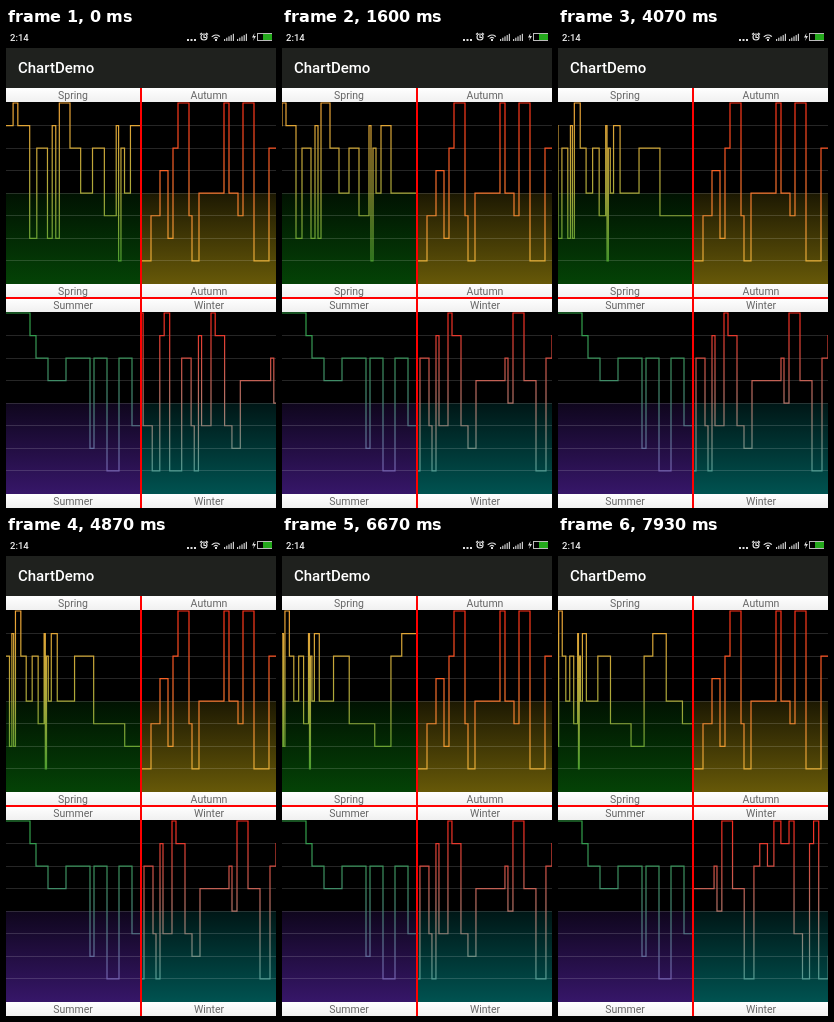
Recreate the animation shown at these times as an HTML page with a canvas. Size 270 by 480 pixels, loop 8 s.

```html
<!DOCTYPE html>
<html lang="en">
<head>
<meta charset="utf-8">
<title>ChartDemo</title>
<style>
html, body { margin: 0; width: 100%; height: 100%; overflow: hidden; background: #000; }
canvas { display: block; width: 270px; height: 480px; }
</style>
</head>
<body>
<canvas id="stage" width="270" height="480"></canvas>
<script>
const ctx = document.getElementById('stage').getContext('2d');
const LOOP = 8000, WIDTH = 134, STEP = 22.55;
const FONT = 'Roboto, "Noto Sans", sans-serif';

const noise = n => Math.abs(Math.sin(n * 12.9898) * 43758.5453) % 1;

// Random [start, level] steps filling the range from..to
function randomSteps(from, to, seed) {
  const steps = [];
  for (let u = from; u < to; u += 4 + 7 * noise(seed++)) steps.push([u, Math.floor(8 * noise(seed + 0.5))]);
  return steps;
}

// steps: [start, level]; view: [time, left, right] of the visible range
const charts = [
  {
    name: 'Spring', x: 0, y: 60, line: ['#f2a436', '#a8a83a', '#2f9a2c'], fill: '4,66,6',
    steps: [[-20, 1], [0, 0], [4, 1], [14, 6], [20, 2], [29, 6], [33, 1], [36, 6], [39, 0], [48, 2], [57, 4],
      [67, 2], [77, 5], [87, 1], [89, 7], [91, 2], [94, 4], [99, 1], [109, 4],
      [138, 2], [170, 5], [222, 6], [255, 2], [277, 1], [311, 4], [352, 5]],
    view: [[0, -6, 107], [440, 0, 134], [3070, 0, 134], [4070, 14, 219], [5470, 30, 269], [5930, 33, 306],
      [6670, 33, 306], [LOOP, 37.5, 380]]
  },
  {
    name: 'Autumn', x: 136, y: 60, line: ['#ff3018', '#f4742c', '#e0c03a'], fill: '102,88,8',
    steps: [[0, 7], [9, 5], [18, 3], [26, 6], [31, 2], [36, 0], [47, 5], [50, 7], [57, 4], [82, 0],
      [87, 4], [96, 5], [101, 0], [112, 7], [127, 2]],
    view: [[0, 0, 134]]
  },
  {
    name: 'Summer', x: 0, y: 270, line: ['#2fa444', '#468474', '#8054c0'], fill: '54,22,104',
    steps: [[0, 0], [24, 1], [30, 2], [42, 3], [60, 2], [84, 6], [88, 2], [101, 7], [113, 2], [126, 5]],
    view: [[0, 0, 134]]
  },
  {
    name: 'Winter', x: 136, y: 270, line: ['#f8281c', '#b07468', '#34a8a0'], fill: '0,82,80',
    steps: [...randomSteps(-40, 0, 7),
      [2, 2], [11, 5], [14, 7], [18, 1], [21, 5], [30, 0], [34, 1], [43, 5], [50, 6], [58, 3],
      [87, 2], [90, 4], [95, 0], [106, 3], [118, 7], [128, 2],
      ...randomSteps(134, 208, 3)],
    view: [[0, -36, 92], [440, 0, 134], [6670, 0, 134], [LOOP, 70, 208]]
  }
];

function rect(x, y, w, h, color) {
  ctx.fillStyle = color;
  ctx.fillRect(x, y, w, h);
}

function text(str, x, y, font, color, align = 'left') {
  ctx.font = `${font} ${FONT}`;
  ctx.fillStyle = color;
  ctx.textAlign = align;
  ctx.fillText(str, x, y);
}

function vertical(y0, y1, colors) {
  const g = ctx.createLinearGradient(0, y0, 0, y1);
  colors.forEach((c, i) => g.addColorStop(i / (colors.length - 1), c));
  return g;
}

function rangeAt(view, t) {
  const i = view.findIndex(key => key[0] > t);
  if (i < 0) return view[view.length - 1].slice(1);
  const a = view[i - 1], b = view[i], p = (t - a[0]) / (b[0] - a[0]);
  return [a[1] + (b[1] - a[1]) * p, a[2] + (b[2] - a[2]) * p];
}

function drawChart({ name, x, y, line, fill, steps, view }, t) {
  const top = y + 15, bottom = top + 8 * STEP, half = top + 4 * STEP;
  const [left, right] = rangeAt(view, t);
  const toX = u => (u - left) / (right - left) * WIDTH;

  ctx.save();
  ctx.translate(x, 0);
  ctx.beginPath();
  ctx.rect(0, y, WIDTH, 210);
  ctx.clip();
  rect(0, y, WIDTH, 210, '#000');
  rect(0, half, WIDTH, bottom - half + 1,
    vertical(half, bottom, [`rgba(${fill},.28)`, `rgba(${fill},1)`]));
  for (let i = 1; i < 8; i++) rect(0, Math.floor(top + i * STEP), WIDTH, 1, 'rgba(255,255,255,.15)');

  ctx.beginPath();
  steps.forEach(([start, level], i) => {
    const end = i + 1 < steps.length ? toX(steps[i + 1][0]) : WIDTH + 5;
    ctx.lineTo(toX(start), top + level * STEP);
    ctx.lineTo(end, top + level * STEP);
  });
  ctx.strokeStyle = vertical(top, bottom, line);
  ctx.lineWidth = 1.2;
  ctx.stroke();
  ctx.restore();

  for (const labelY of [y, y + 196]) {
    rect(x, labelY, WIDTH, 14, vertical(labelY, labelY + 14, ['#fff', '#f0f0f0']));
    text(name, x + 67, labelY + 11, '10.5px', '#666', 'center');
  }
}

function drawIcons() {
  for (let i = 0; i < 3; i++) rect(181 + i * 3.5, 11, 2, 2, '#ddd');
  ctx.strokeStyle = '#ddd';
  ctx.lineWidth = 1.2;
  ctx.beginPath();
  ctx.arc(198, 9, 3, 0, 7);
  ctx.moveTo(198, 7);
  ctx.lineTo(198, 9.5);
  ctx.lineTo(200, 9.5);
  for (const side of [-1, 1]) {
    ctx.moveTo(198 + side * 4, 6.5);
    ctx.lineTo(198 + side * 2, 5);
  }
  for (const r of [2.5, 5]) {
    ctx.moveTo(210 - r * 0.75, 12 - r * 0.66);
    ctx.arc(210, 12, r, -2.42, -0.72);
  }
  ctx.stroke();
  rect(209, 11, 2, 2, '#ddd');

  for (const x of [218, 231]) {
    for (let i = 0; i < 5; i++) rect(x + i * 2.2, 11 - i * 1.3, 1.2, 2 + i * 1.3, '#ccc');
  }
  ctx.fillStyle = '#ddd';
  ctx.fill(new Path2D('M248.5 5L246 9.5H248L247 13L250 8H248Z'));
  ctx.strokeStyle = '#bbb';
  ctx.lineWidth = 1;
  ctx.strokeRect(251.5, 5.5, 14, 7);
  rect(257, 6, 9, 6, '#24a81c');
}

function draw(now) {
  const t = now % LOOP;
  rect(0, 0, 270, 20, '#000');
  rect(0, 20, 270, 40, '#1f211e');
  text('2:14', 4, 13, '500 9.5px', '#eee');
  text('ChartDemo', 12, 45, '500 15px', '#fff');
  drawIcons();
  for (const chart of charts) drawChart(chart, t);
  rect(0, 269, 270, 2, '#f00');
  rect(134, 60, 2, 420, '#f00');
  requestAnimationFrame(draw);
}
requestAnimationFrame(draw);
</script>
</body>
</html>
```
